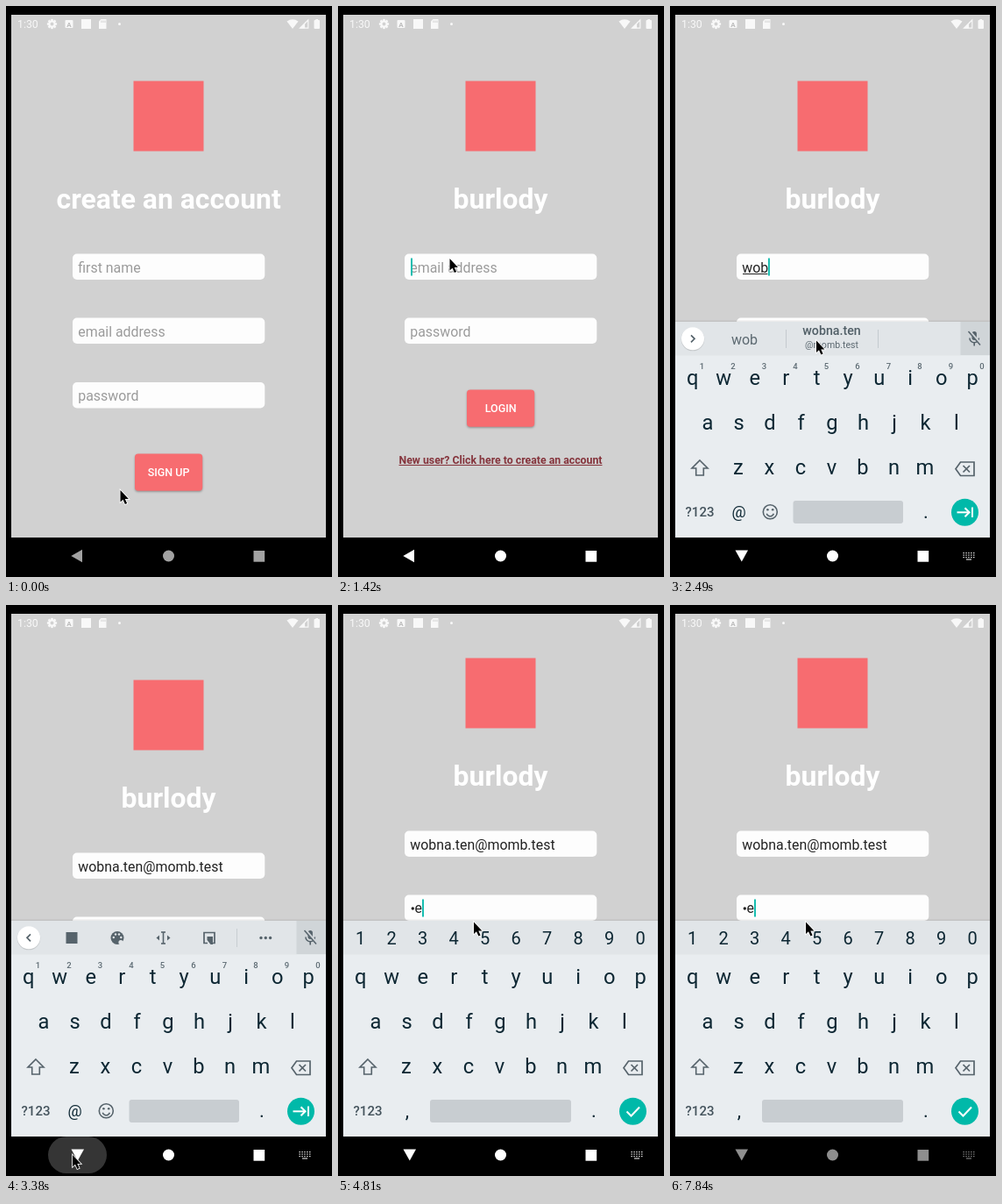
Animation, 372 px wide and 651 px high, one loop 8000 ms. Source, as an HTML page with a canvas:

```html
<!DOCTYPE html>
<html lang="en">
<head>
<meta charset="utf-8">
<title>Login demo</title>
<style>
html, body { margin: 0; width: 100%; height: 100%; overflow: hidden; background: #000; }
canvas { display: block; width: 372px; height: 651px; }
</style>
</head>
<body>
<canvas id="stage" width="372" height="651"></canvas>
<script>
const c = document.getElementById('stage').getContext('2d');
const LOOP = 8000, STEP = 178.4;
const RED = '#f76c70', TEAL = '#00b9a9', INK = '#0d2733', ICON = '#56636b', GREY = '#d1d1d1';
const USER = 'wobna.ten', HOST = '@momb.test', APP = 'burlody';

const ramp = (t, a, b) => {
  const p = Math.min(1, Math.max(0, (t - a) / (b - a)));
  return p * p * (3 - 2 * p);
};
const blink = (t, since) => (t - since) % 1000 < 500;

function text(s, x, y, size, color, weight = 400, align = 'center') {
  c.font = `${weight} ${size}px Roboto, sans-serif`;
  c.fillStyle = color;
  c.textAlign = align;
  c.fillText(s, x, y);
  return c.measureText(s).width;
}
function rect(x, y, w, h, color) {
  c.fillStyle = color;
  c.fillRect(x, y, w, h);
}
function box(x, y, w, h, r, color) {
  c.beginPath();
  c.roundRect(x, y, w, h, r);
  c.fillStyle = color;
  c.fill();
}
function disc(x, y, r, color) {
  c.beginPath();
  c.arc(x, y, r, 0, 7);
  c.fillStyle = color;
  c.fill();
}
function trace(pts, closed) {
  c.beginPath();
  for (let i = 0; i < pts.length; i += 2) c.lineTo(pts[i], pts[i + 1]);
  if (closed) c.closePath();
}
function poly(pts, color) {
  trace(pts, true);
  c.fillStyle = color;
  c.fill();
}
function line(pts, color, width = 1.6, closed = false) {
  trace(pts, closed);
  c.strokeStyle = color;
  c.lineWidth = width;
  c.stroke();
}

function statusBar() {
  const w = '#f8f8f8';
  text('1:30', 13, 25, 12.3, w, 400, 'left');
  for (let i = 0; i < 4; i++) {
    const a = i * Math.PI / 4, x = Math.cos(a) * 5.6, y = Math.sin(a) * 5.6;
    line([52.5 - x, 20.5 - y, 52.5 + x, 20.5 + y], w, 2.6);
  }
  disc(52.5, 20.5, 4.1, w);
  disc(52.5, 20.5, 1.9, GREY);
  box(67.5, 16, 9, 9, 1, w);
  text('A', 72, 23.5, 8, '#bbb', 700);
  rect(86, 15, 11, 11, w);
  poly([108.5, 15, 114.5, 15, 114.5, 26, 106, 26, 106, 17.5], w);
  for (let i = 0; i < 3; i++) rect(108.5 + i * 2, 16.5, 1, 2.5, GREY);
  disc(129.5, 20.5, 1.5, w);
  c.beginPath();
  c.moveTo(327, 26);
  c.lineTo(320.5, 17.5);
  c.quadraticCurveTo(327, 13, 333.5, 17.5);
  c.fillStyle = w;
  c.fill();
  line([335.5, 25.2, 344.8, 25.2, 344.8, 16], w, 1.2, true);
  poly([335.5, 25.5, 341, 25.5, 341, 20], w);
  box(351.5, 16, 6.5, 10, 1, w);
  rect(353.4, 15, 2.7, 2, w);
}

function caretAt(x, y) {
  rect(x, y, 2, 20, '#17bdb0');
}
function field(y, value, hint, caret, underline) {
  box(76, y, 219.3, 29.5, 5, '#fdfdfd');
  const w = text(value || hint, 82.3, y + 21, 15.9, value ? '#222' : '#9b9b9b', 400, 'left');
  if (underline) rect(83, y + 22.5, w - 1.5, 1, '#222');
  if (caret) caretAt(value ? 82 + w : 83, y + 5);
}

function button(label, y) {
  c.save();
  c.shadowColor = 'rgba(0,0,0,.3)';
  c.shadowBlur = 2.5;
  c.shadowOffsetY = 1.2;
  box(147, y - 0.5, 77.2, 42.2, 4, RED);
  c.restore();
  text(label, 185.6, y + 25.3, 12.5, '#fff', 500);
}

function page(title) {
  rect(6, -60, 359, 760, GREY);
  rect(145.5, 85.5, 80, 80, RED);
  text(title, 185.6, 230.7, 31.9, '#fff', 700);
}

function signup() {
  page('create an account');
  field(282.5, '', 'first name');
  field(355.5, '', 'email address');
  field(429, '', 'password');
  button('SIGN UP', 511);
}

function login(t) {
  const typed = t < 1940 ? 0 : t < 2120 ? 1 : t < 2300 ? 2 : t < 2660 ? 3 : 99;
  const since = [1400, 1940, 2120, 2300][typed] || 2660;
  const pass = t > 4630 ? 'h' : '';
  const onMail = t > 1400 && t < 4050, onPass = t >= 4050;
  page(APP);
  field(282.5, (USER + HOST).slice(0, typed), 'email address', onMail && blink(t, since), typed > 0 && typed < 4);
  const lit = onPass && blink(t, t < 4630 ? 4050 : t < 4770 ? 4630 : 4770);
  if (t < 4770) field(355.5, pass, 'password', lit);
  else {
    field(355.5, '', '');
    disc(85.3, 371, 1.7, '#222');
    text('e', 87.6, 376.3, 15.9, '#222', 400, 'left');
    if (lit) caretAt(96, 360.5);
  }
  button('LOGIN', 438);
  const link = 'New user? Click here to create an account';
  const w = text(link, 185.5, 522, 12.3, '#85343c', 700);
  rect(185.5 - w / 2, 523, w, 1, '#85343c');
}

function mic() {
  rect(331.5, 360, 33.5, 38, '#d0d5d8');
  box(344.5, 371, 5.4, 10, 2.7, ICON);
  c.beginPath();
  c.arc(347.2, 378.5, 5.3, 0, Math.PI);
  c.strokeStyle = ICON;
  c.lineWidth = 1.5;
  c.stroke();
  line([347.2, 383.5, 347.2, 387.5], ICON, 1.6);
  line([341.5, 370.5, 355, 386], '#d0d5d8', 3);
  line([340.5, 371, 354, 386.5], ICON, 1.5);
}

function tools() {
  rect(68.5, 373, 13, 13, ICON);
  disc(127, 379.5, 7.5, ICON);
  for (const [x, y] of [[122.8, 379], [125, 375.5], [129, 375.5], [131.3, 379]]) disc(x, y, 1.2, '#e1e5e8');
  disc(131, 384.5, 2.6, '#e1e5e8');
  line([177, 373, 182, 373], ICON);
  line([177, 386, 182, 386], ICON);
  line([179.5, 373, 179.5, 386], ICON);
  poly([171.5, 379.5, 175, 376.5, 175, 382.5], ICON);
  poly([187.5, 379.5, 184, 376.5, 184, 382.5], ICON);
  line([230, 385.5, 226, 385.5, 226, 373.5, 238, 373.5, 238, 385.5, 236, 385.5], ICON, 1.7);
  poly([229.5, 378, 236, 378, 236, 387, 233.5, 387, 229.5, 382], ICON);
  rect(263, 369, 1, 21, '#c8cdd1');
  for (let i = 0; i < 3; i++) disc(291 + i * 5.3, 379.5, 1.7, ICON);
}

function strip(t) {
  const suggest = t > 1940 && t < 2840;
  disc(26, 380, 13.3, 'rgba(0,0,0,.12)');
  disc(26, 379.3, 13, '#fff');
  const d = suggest ? 2 : -2;
  line([26 - d, 375.3, 26 + d, 379.3, 26 - d, 383.3], ICON, 1.7);
  if (suggest) {
    text(USER.slice(0, t < 2120 ? 1 : t < 2300 ? 2 : 3), 85, 385.5, 16, '#5c6971');
    rect(132, 369, 1, 21, '#c4cacf');
    rect(237, 369, 1, 21, '#c4cacf');
    text(USER, 184.5, 375, 14.2, '#505e66', 500);
    text(HOST, 184.5, 389.5, 10.6, '#5c6971');
  } else tools();
  mic();
}

function keyboard(t, secret) {
  rect(6, 358.5, 359, 1.5, 'rgba(0,0,0,.07)');
  rect(6, 360, 359, 246, '#e9edf0');
  rect(6, 360, 359, 38.5, '#e1e5e8');
  if (!secret) strip(t);
  [...'1234567890'].forEach((d, i) => {
    if (secret) text(d, 25.5 + i * 35.5, 387, 20, INK);
    else text(d, 36.5 + i * 35.5, 414, 9.5, '#5d6b73', 500);
  });
  const rows = [['qwertyuiop', 25.7, 431.5], ['asdfghjkl', 43, 482.5], ['zxcvbnm', 78, 534]];
  for (const [keys, x, y] of rows)
    [...keys].forEach((k, i) => text(k, x + i * 35.5, y, 23.7, INK));

  line([34, 518, 43, 527, 38.3, 527, 38.3, 535, 29.7, 535, 29.7, 527, 25, 527], ICON, 1.6, true);
  line([331.5, 520, 347, 520, 347, 535.5, 331.5, 535.5, 326, 527.7], ICON, 1.7, true);
  line([334.5, 524, 342, 531.5], ICON, 1.7);
  line([342, 524, 334.5, 531.5], ICON, 1.7);

  text('?123', 34, 582.3, 15, '#44535c', 500);
  text('.', 292, 584, 22, INK);
  const left = secret ? 105 : 140.5;
  box(left, 564, 266 - left, 26, 3, '#c8cdd1');
  disc(336.5, 577.3, 15.5, TEAL);
  if (secret) {
    text(',', 79, 584, 22, INK);
    line([329.5, 577.5, 334.5, 582.5, 344, 572.5], '#fff', 2);
    return;
  }
  text('@', 78.5, 583.3, 18, INK);
  c.beginPath();
  c.arc(114.3, 576.8, 8, 0, 7);
  c.strokeStyle = ICON;
  c.lineWidth = 1.6;
  c.stroke();
  c.beginPath();
  c.arc(114.3, 577.5, 4.2, 0.3, Math.PI - 0.3);
  c.stroke();
  disc(111.4, 574.3, 1.3, ICON);
  disc(117.2, 574.3, 1.3, ICON);
  line([327.5, 577.3, 341, 577.3], '#fff', 2);
  line([336.5, 572.3, 341.5, 577.3, 336.5, 582.3], '#fff', 2);
  line([345, 571.5, 345, 583], '#fff', 2);
}

function navBar(t, ime) {
  const wake = ramp(t, 300, 560), dim = ramp(t, 5200, 6750);
  const v = Math.round(162 + 93 * wake - 113 * dim), color = `rgb(${v},${v},${v})`;
  for (const [a, b] of [[510, 900], [3370, 3740]]) {
    if (t > a && t < b) {
      c.globalAlpha = 1 - ramp(t, a + 100, b);
      box(48, 606, 67, 42, 21, '#353535');
      c.globalAlpha = 1;
    }
  }
  if (ime) {
    poly([74.5, 620.5, 89, 620.5, 81.8, 633.5], color);
    for (let i = 0; i < 5; i++)
      for (let j = 0; j < 3; j++) rect(334.5 + i * 2.9, 623 + j * 2.5, 1.3, 1.2, color);
    rect(338, 630.5, 6, 1, color);
  } else poly([74.3, 627, 87, 619.8, 87, 634.2], color);
  disc(185.5, 627, 6.5, color);
  rect(282.5, 621, 12.7, 12.7, color);
}

const PATH = [
  [0, 130.5, 552], [150, 129, 556], [480, 76, 627], [870, 76, 627], [1240, 127.5, 288],
  [2200, 127.5, 288], [2480, 167, 381.5], [2800, 167, 381.5], [3200, 76, 627],
  [3620, 76, 627], [3960, 155, 361.5], [8000, 155, 361.5]
];
function pointer(t) {
  const i = PATH.findIndex(p => p[0] > t);
  const [a, x, y] = PATH[i - 1], [b, u, v] = PATH[i], p = ramp(t, a, b);
  c.save();
  c.translate(x + (u - x) * p, y + (v - y) * p);
  const arrow = [0, 0, 0, 13.5, 3, 10.8, 5.4, 16, 7.6, 15, 5.3, 9.9, 9.4, 9.9];
  line(arrow, '#fff', 1.6, true);
  poly(arrow, '#000');
  c.restore();
}

function draw(t) {
  rect(0, 0, 372, 651, '#000');
  const first = ramp(t, 1540, 1790) - ramp(t, 3480, 3720);
  const second = ramp(t, 4180, 4440), up = Math.max(first, second);

  c.save();
  c.beginPath();
  c.rect(6, 10, 359, 596);
  c.clip();
  c.save();
  c.translate(0, -25 * ramp(t, 4200, 4470));
  login(t);
  const leave = ramp(t, 560, 860);
  if (leave < 1) {
    c.globalAlpha = 1 - leave;
    c.translate(0, 24 * leave);
    signup();
  }
  c.restore();
  statusBar();
  if (up > 0) {
    c.translate(0, 248 * (1 - up));
    keyboard(t, second > 0);
  }
  c.restore();

  navBar(t, (t > 1540 && t < 3550) || t > 4180);
  pointer(t);
}

function tick(now) {
  const t = now % LOOP;
  draw(Math.min(44, Math.floor((t + 10) / STEP)) * STEP);
  requestAnimationFrame(tick);
}
requestAnimationFrame(tick);
</script>
</body>
</html>
```
